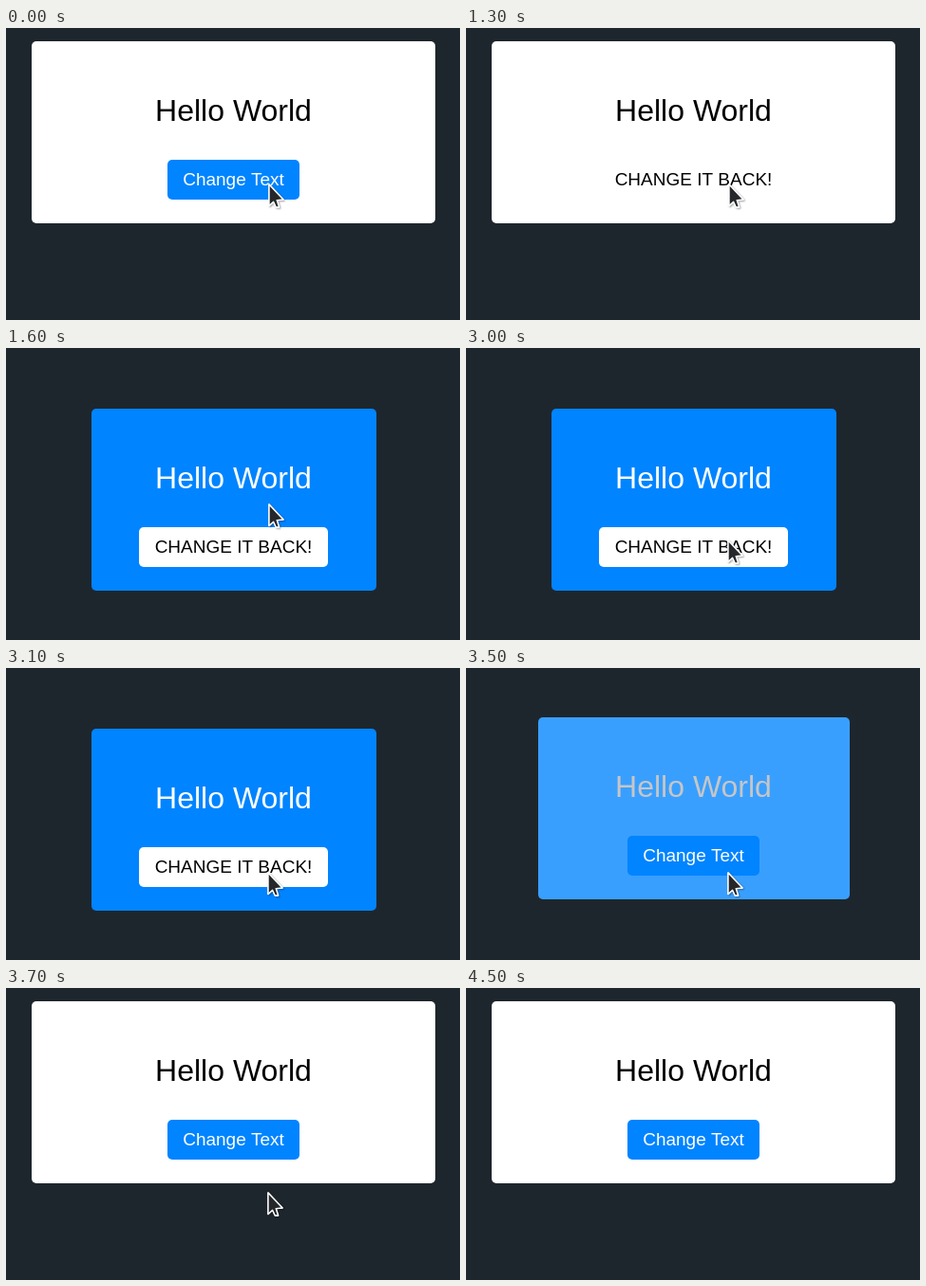
These frames come from a looping animation (478 px wide and 308 px high, 5.3 s). An HTML page with a canvas:

```html
<!DOCTYPE html>
<html lang="en">
<head>
<meta charset="utf-8">
<title>Change Text</title>
<style>
  html, body { margin: 0; width: 100%; height: 100%; overflow: hidden; background: #1e262d; }
  canvas { display: block; }
</style>
</head>
<body>
<canvas id="stage" width="478" height="308"></canvas>
<script>
const ctx = document.getElementById('stage').getContext('2d');
const LOOP = 5300, STEP = 100, DURATION = 250;
const TO_BLUE = 1300, TO_WHITE = 3458;
const BLUE = [0, 132, 255], WHITE = [255, 255, 255], BLACK = [0, 0, 0];
const CENTER = 239.6;

const mix = (a, b, p) => a + (b - a) * p;
const rgb = c => `rgb(${c.map(Math.round).join(',')})`;
const mixColor = (a, b, p) => rgb(a.map((v, i) => mix(v, b[i], p)));

// CSS "ease": cubic-bezier(.25, .1, .25, 1)
function ease(x) {
  if (x <= 0) return 0;
  if (x >= 1) return 1;
  const bezier = (s, a, b) => 3 * (1 - s) ** 2 * s * a + 3 * (1 - s) * s * s * b + s ** 3;
  let low = 0, high = 1;
  for (let i = 0; i < 30; i++) {
    const mid = (low + high) / 2;
    if (bezier(mid, .25, .25) < x) low = mid; else high = mid;
  }
  return bezier(low, .1, 1);
}

// Rounded box with edges snapped to whole pixels
function box(left, top, right, bottom, color) {
  const [l, t, r, b] = [left, top, right, bottom].map(Math.round);
  ctx.fillStyle = color;
  ctx.beginPath();
  ctx.roundRect(l, t, r - l, b - t, 5);
  ctx.fill();
}

function label(text, size, baseline, color) {
  ctx.font = `${size}px "Liberation Sans", Arial, sans-serif`;
  ctx.textAlign = 'center';
  ctx.fillStyle = color;
  ctx.fillText(text, 239.5, baseline);
}

function cursorAt(t) {
  if (t < 3000) return [276, 164];
  if (t < 3100) return [275, 202];
  if (t < 4000) return [275, 215];
  if (t >= 4500) return null;
  const p = ((t - 3900) / 500) ** 1.2;
  return [mix(275, 97, p), mix(215, 13, p)];
}

function drawCursor([x, y]) {
  ctx.save();
  ctx.translate(x, y);
  const arrow = new Path2D('M1 1V23.5L5.6 19.2L8.3 25H11.6L9.2 17.6L16 17Z');
  ctx.lineWidth = 1.4;
  ctx.lineJoin = 'round';
  ctx.strokeStyle = '#fff';
  ctx.shadowColor = 'rgba(0,0,0,.45)';
  ctx.shadowBlur = 2;
  ctx.shadowOffsetX = ctx.shadowOffsetY = 1;
  ctx.stroke(arrow);
  ctx.shadowColor = 'transparent';
  ctx.fillStyle = '#25272b';
  ctx.fill(arrow);
  ctx.stroke(arrow);
  ctx.restore();
}

function draw(t) {
  const active = t >= TO_BLUE && t < TO_WHITE;
  const p = ease((t - TO_BLUE) / DURATION) - ease((t - TO_WHITE) / DURATION);
  const half = mix(425, 300, p) / 2;
  const top = mix(13.6, 63.6, p);
  const buttonTop = Math.round(top + 124.92);

  ctx.fillStyle = '#1e262d';
  ctx.fillRect(0, 0, 478, 308);
  box(CENTER - half, top, CENTER + half, top + 191.92, mixColor(WHITE, BLUE, p));
  label('Hello World', 32, Math.round(top) + 84, mixColor(BLACK, WHITE, p));

  const [left, right] = active ? [140, 339] : [170, 309];
  box(left, buttonTop, right, buttonTop + 42, rgb(active ? WHITE : BLUE));
  label(active ? 'CHANGE IT BACK!' : 'Change Text', 19, buttonTop + 27, rgb(active ? BLACK : WHITE));

  const cursor = cursorAt(t);
  if (cursor) drawCursor(cursor);
}

const start = performance.now();
function frame() {
  const t = (performance.now() - start) % LOOP;
  draw(Math.floor(t / STEP) * STEP);
  requestAnimationFrame(frame);
}
frame();
</script>
</body>
</html>
```
